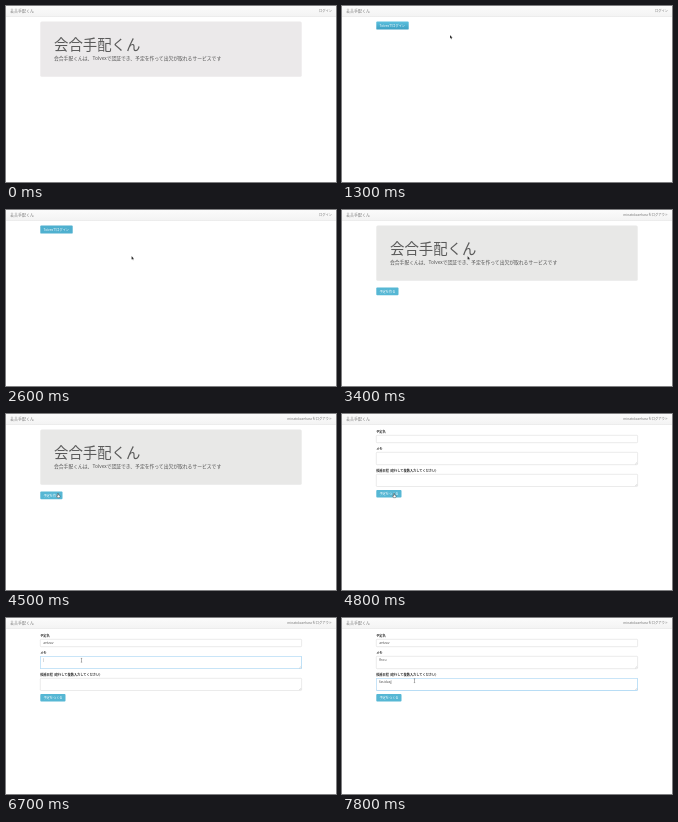
An HTML page for the animation above (8 s loop, 330 by 176 pixels).

```html
<!DOCTYPE html>
<html lang="ja">
<head>
<meta charset="utf-8">
<title>会合手配くん</title>
<style>
html, body { margin: 0; width: 100%; height: 100%; overflow: hidden; background: #fff; }
svg { display: block; width: 330px; height: 176px; }
text { font-family: "Noto Sans CJK JP", "Noto Sans CJK", "Noto Sans", sans-serif; font-size: 3.2px; fill: #333; white-space: pre; }
.brand { font-size: 4px; fill: #777; }
.nav { font-size: 3.25px; fill: #777; text-anchor: end; }
.title { font-size: 14.4px; font-weight: 300; fill: #5a5a5a; }
.lead { font-size: 4.8px; fill: #505050; }
.label { font-weight: 700; }
.value { font-size: 3.4px; fill: #555; }
.btn text { fill: #fff; }
.field { fill: #fff; stroke: #ccc; stroke-width: .4; }
.focus .field { stroke: #72bcea; filter: drop-shadow(0 0 .6px rgba(82, 168, 236, .4)); }
.grip { stroke: #999; stroke-width: .3; }
[hidden] { display: none; }
</style>
</head>
<body>
<svg viewBox="0 0 330 176">
  <defs>
    <linearGradient id="bar" x2="0" y2="1"><stop stop-color="#fbfbfb"/><stop offset="1" stop-color="#f3f3f3"/></linearGradient>
    <linearGradient id="blue" x2="0" y2="1"><stop stop-color="#5bc0de"/><stop offset="1" stop-color="#3c9fc2"/></linearGradient>
  </defs>

  <rect width="330" height="10.8" fill="url(#bar)"/>
  <rect y="10.6" width="330" height=".4" fill="#dedede"/>
  <text class="brand" x="4" y="6.6">会合手配くん</text>
  <text class="nav" id="nav" x="326" y="6.3"></text>

  <g id="home">
    <rect id="hero" x="34.3" y="15.6" width="261.4" height="55.2" rx="1.5"/>
    <text class="title" x="48" y="44.3">会合手配くん</text>
    <text class="lead" x="48" y="54.4">会合手配くんは、Tolvexで認証でき、予定を作って出欠が取れるサービスです</text>
  </g>
  <g id="create" class="btn">
    <rect x="34.3" y="77.5" width="22.2" height="7.7" rx=".9" fill="#56b7d4"/>
    <text x="37.4" y="82.6">予定を作る</text>
  </g>
  <g id="login" class="btn">
    <rect id="loginBox" x="34.3" y="15.6" width="32.4" height="8" rx=".9"/>
    <text x="37.6" y="20.8">Tolvexでログイン</text>
  </g>
  <g id="form">
    <text class="label" x="34.2" y="18.8">予定名</text>
    <text class="label" x="34.2" y="35.7">メモ</text>
    <text class="label" x="34.2" y="57.7">候補日程 (改行して複数入力してください)</text>
    <g id="fields"></g>
    <g class="btn">
      <rect x="34.3" y="76" width="25.2" height="7.4" rx=".9" fill="#56b7d4"/>
      <text x="37.4" y="80.9">予定をつくる</text>
    </g>
  </g>

  <g id="pointer">
    <path id="arrow" d="M0 0V3.6L.9 2.9L1.5 4.2L2.1 3.9L1.5 2.7H2.6Z" fill="#111" stroke="#fff" stroke-width=".25"/>
    <path id="hand" d="M-.4 0H.4V1.5L2 2V3.2L1.5 4.2H-.5L-1.7 2.4L-1.2 2L-.4 2.7Z" fill="#fff" stroke="#222" stroke-width=".4"/>
    <path id="beam" d="M-.7-1.9H.7M0-1.9V1.9M-.7 1.9H.7" fill="none" stroke="#444" stroke-width=".4"/>
  </g>
</svg>
<script>
const LOOP = 8000, TICK = 100;
const $ = id => document.getElementById(id);
const show = (id, on) => $(id).toggleAttribute('hidden', !on);

// Pointer path: time, x, y
const path = [
  [1300, 108, 29], [1400, 102, 28], [2100, 50, 19], [2300, 50, 19],
  [2600, 125.5, 46], [3700, 125.5, 46], [3900, 120, 62], [4000, 120, 62],
  [4500, 52, 79.5], [5100, 52, 79.5], [5700, 80, 25], [6400, 80, 25],
  [6600, 75.5, 42.3], [6900, 75.5, 42.3], [7200, 72.5, 62.7]
];

// Form fields: top, height, text, focus start, focus end, ms per letter
const fields = [
  [21.3, 7.4, 'aetzav', 5900, 6700, 100],
  [38.3, 12.4, 'fhou', 6700, 7200, 100],
  [60.3, 12.2, 'fasidasj', 7200, LOOP, 75]
].map(([y, h, text, from, to, pace], i) => {
  const g = document.createElementNS('http://www.w3.org/2000/svg', 'g');
  const b = y + h;
  g.innerHTML = `<rect class="field" x="34.3" y="${y}" width="261.3" height="${h}" rx=".8"/>
    <text class="value" x="37.2" y="${y + 5}"></text>` +
    (i ? `<path class="grip" d="M293.2 ${b - .5}L295.1 ${b - 2.4}M294.3 ${b - .5}L295.1 ${b - 1.3}"/>` : '');
  $('fields').append(g);
  const label = g.querySelector('text');
  return t => {
    const on = t >= from && t < to;
    const n = Math.max(0, Math.floor((t - from) / pace));
    g.classList.toggle('focus', on);
    label.textContent = text.slice(0, n) + (on ? '|' : '');
  };
});

function pointerAt(t) {
  const i = path.findIndex(p => p[0] > t);
  if (i < 0) return path.at(-1).slice(1);
  const [t0, x0, y0] = path[Math.max(0, i - 1)], [t1, x1, y1] = path[i];
  const k = t1 > t0 ? (t - t0) / (t1 - t0) : 0;
  return [x0 + (x1 - x0) * k, y0 + (y1 - y0) * k];
}

function draw(t) {
  const page = t < 1300 ? 'home' : t < 3400 ? 'login' : t < 4800 ? 'member' : 'form';
  const signedIn = t >= 3400;
  show('home', page === 'home' || page === 'member');
  show('create', page === 'member');
  show('login', page === 'login');
  show('form', page === 'form');
  $('nav').textContent = signedIn ? 'minatokazehara をログアウト' : 'ログイン';
  $('hero').setAttribute('fill', signedIn ? '#e8e8e7' : '#ebe9ea');
  $('loginBox').setAttribute('fill', t < 2200 ? 'url(#blue)' : '#4fb0cf');

  const [x, y] = pointerAt(t);
  const inside = (l, top, r, b) => x > l && x < r && y > top && y < b;
  const hand = page === 'login' && inside(34, 15, 67, 24)
    || page === 'member' && inside(34, 77, 57, 86)
    || page === 'form' && inside(34, 76, 60, 84);
  const beam = page === 'form' && (inside(34, 21, 296, 29) || inside(34, 38, 296, 51) || inside(34, 60, 296, 73));
  $('pointer').setAttribute('transform', `translate(${x} ${y})`);
  show('pointer', t >= 1300);
  show('hand', hand);
  show('beam', beam);
  show('arrow', !hand && !beam);
  fields.forEach(update => update(t));
}

const origin = performance.now();
function frame() {
  const t = (performance.now() - origin) % LOOP;
  draw(Math.floor(t / TICK) * TICK);
  requestAnimationFrame(frame);
}
frame();
</script>
</body>
</html>
```
